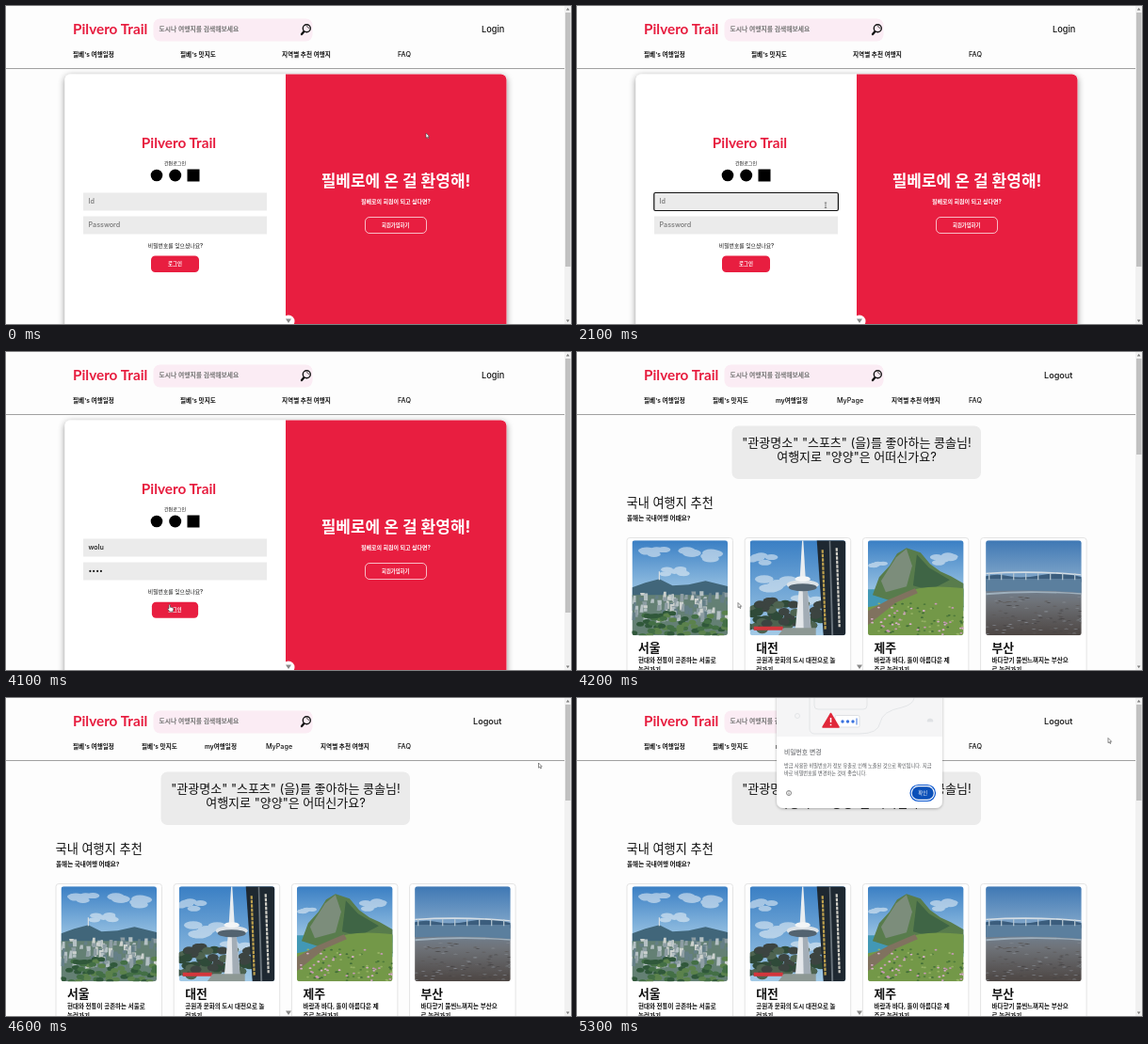
An HTML page that plays this animation: 600 px wide and 338 px high, repeating every 5.4 s.

```html
<!DOCTYPE html>
<html lang="ko">
<head>
<meta charset="utf-8">
<title>Travel login</title>
<style>
  html, body { margin: 0; width: 100%; height: 100%; overflow: hidden; background: #fdfdfd; }
  svg { display: block; }
  text { font-family: Inter, "Noto Sans CJK KR", "Noto Sans CJK", sans-serif; font-weight: 500; fill: #111; }
  .logo { font: 700 15.3px Lato, sans-serif; fill: #e71d3f; }
  .nav text { font-size: 6.6px; font-weight: 600; }
  .nav .en { font-size: 7.2px; font-weight: 500; }
  .b { font-weight: 700; }
  .s { font-weight: 600; }
  .r { font-weight: 400; }
  .m { text-anchor: middle; }
  .w { fill: #fff; }
  .hint { fill: #757575; }
  .soft { fill: #505357; }
  .field { fill: #ebebeb; }
  .red { fill: #e81e40; }
</style>
</head>
<body>
<svg width="600" height="338" viewBox="0 0 600 338">
  <defs>
    <filter id="shadow" x="-10%" y="-10%" width="120%" height="120%">
      <feDropShadow dx="0" dy="2" stdDeviation="3.5" flood-opacity=".45"/>
    </filter>
    <filter id="faint" x="-10%" y="-10%" width="120%" height="120%">
      <feDropShadow dx="0" dy="1" stdDeviation="1.5" flood-opacity=".28"/>
    </filter>
    <linearGradient id="sky" x2="0" y2="1">
      <stop stop-color="#3a7fc4"/><stop offset="1" stop-color="#a3cae6"/>
    </linearGradient>
    <linearGradient id="dusk" x2="0" y2="1">
      <stop stop-color="#3f78b4"/><stop offset="1" stop-color="#86aacb"/>
    </linearGradient>
    <linearGradient id="sand" x2="0" y2="1">
      <stop stop-color="#7188a0"/><stop offset=".4" stop-color="#6f7379"/><stop offset="1" stop-color="#4c4542"/>
    </linearGradient>
    <clipPath id="round"><rect width="101.5" height="101" rx="3"/></clipPath>
  </defs>
  <rect width="600" height="338" fill="#fdfdfd"/>

  <!-- header -->
  <text class="logo" x="71" y="30">Pilvero Trail</text>
  <rect x="156.5" y="13.5" width="169" height="24" rx="7" fill="#fbecf4"/>
  <text class="s hint" x="162.5" y="27.2" font-size="6.8">도시나 여행지를 검색해보세요</text>
  <g fill="none" stroke="#111" stroke-linecap="round">
    <circle cx="319.3" cy="23.8" r="4" stroke-width="1.4"/>
    <path d="M316.3 27.2l-2.3 2.8" stroke-width="2.3"/>
    <path d="M319.3 21.6a2.3 2.3 0 0 1 2.2 2" stroke-width=".7"/>
  </g>
  <path d="M0 66.5H593" stroke="#a0a0a0"/>

  <g id="loginPage">
    <text x="505" y="27.8" font-size="9.2">Login</text>
    <g class="nav">
      <text x="71" y="53.8">필베's 여행일정</text>
      <text x="185" y="53.8">필베's 맛지도</text>
      <text x="293" y="53.8">지역별 추천 여행지</text>
      <text class="en" x="416" y="54">FAQ</text>
    </g>
    <rect x="62.5" y="72.5" width="469" height="290" rx="6" fill="#fff" filter="url(#shadow)"/>
    <path class="red" d="M297 72.5H525.5a6 6 0 0 1 6 6V338H297z"/>

    <text class="logo m" x="183.5" y="151">Pilvero Trail</text>
    <text class="m" x="179.5" y="169" font-size="5">간편로그인</text>
    <circle cx="160" cy="180" r="6.3"/>
    <circle cx="179.7" cy="180" r="6.5"/>
    <rect x="192.5" y="173.5" width="13" height="13"/>

    <rect class="field" x="82" y="198.5" width="195" height="19"/>
    <rect class="field" x="82" y="223.5" width="195" height="19"/>
    <rect id="focus" x="81.8" width="195.6" height="19" rx="1.5" fill="none" stroke="#111" stroke-width="1.2"/>
    <text id="user" x="87.5" y="210" font-size="7.2"></text>
    <text id="pass" x="87.5" y="235.3" font-size="7.2"></text>
    <path id="caret" stroke="#111" stroke-width=".8"/>
    <text class="m" x="180" y="257" font-size="5.85">비밀번호를 잊으셨나요?</text>
    <g id="button">
      <rect class="red" x="154" y="265.5" width="51" height="17.5" rx="4.5"/>
      <text class="b m w" x="179.5" y="276" font-size="5.4">로그인</text>
    </g>

    <text class="b m w" x="414" y="192.2" font-size="17">필베로에 온 걸 환영해!</text>
    <text class="b m w" x="414" y="210.2" font-size="6">필베로의 회원이 되고 싶다면?</text>
    <rect x="381.5" y="224.5" width="65" height="17" rx="4.5" fill="none" stroke="#fff" stroke-width=".7"/>
    <text class="b m w" x="413.7" y="234.7" font-size="5.3">회원가입하기</text>
    <circle cx="300" cy="335" r="6.5" fill="#fff"/>
  </g>

  <g id="homePage">
    <text x="496" y="27.8" font-size="9.1">Logout</text>
    <g class="nav">
      <text x="71" y="53.8">필베's 여행일정</text>
      <text x="144" y="53.8">필베's 맛지도</text>
      <text x="211" y="53.8">my여행일정</text>
      <text class="en" x="276" y="54">MyPage</text>
      <text x="334" y="53.8">지역별 추천 여행지</text>
      <text class="en" x="416" y="54">FAQ</text>
    </g>
    <rect x="164.5" y="78.5" width="264.5" height="56.5" rx="7" fill="#ebebeb"/>
    <text class="r m" x="297" y="100.8" font-size="13">"관광명소" "스포츠" (을)를 좋아하는 콩솔님!</text>
    <text class="r m" x="297" y="116" font-size="13">여행지로 "양양"은 어떠신가요?</text>
    <text class="r" x="52.5" y="165.3" font-size="13.2">국내 여행지 추천</text>
    <text class="b" x="53" y="178.8" font-size="6.6">올해는 국내여행 어때요?</text>
    <g id="cards"></g>
  </g>
  <path d="M297 332.5h6l-3 4.5z" fill="#888"/>

  <g id="popup">
    <path d="M212 -9H388V110a7 7 0 0 1 -7 7H219a7 7 0 0 1 -7 -7z" fill="#fff" filter="url(#faint)"/>
    <path d="M212 0H388V41H212z" fill="#f5f5f6"/>
    <g fill="none" stroke="#dfe1e4" stroke-width=".8">
      <path d="M247 0V33a5 5 0 0 0 5 5H300Q320 38 322 26T345 10Q357 7 358 0M252 0V8a4 4 0 0 0 4 4H304a4 4 0 0 0 4 -4V0"/>
      <circle cx="234" cy="19" r="2.5"/>
      <path d="M372 25a3 3 0 0 1 6 0z" fill="#dfe1e4"/>
    </g>
    <rect x="274" y="18.5" width="26" height="12.5" rx="1.5" fill="#fff" stroke="#dfe1e4"/>
    <g fill="#3b73e0">
      <circle cx="282" cy="25" r="1.7"/><circle cx="287.5" cy="25" r="1.7"/><circle cx="293" cy="25" r="1.7"/>
      <path d="M296.5 21.5h1v7h-1z"/>
    </g>
    <path d="M269.5 16.5l8.5 14.5h-17z" fill="#e0283a" stroke="#e0283a" stroke-width="1.5" stroke-linejoin="round"/>
    <path d="M269.5 21v5M269.5 27.7v1.5" stroke="#fff" stroke-width="1.5"/>
    <text class="r soft" x="220" y="60" font-size="6.8">비밀번호 변경</text>
    <text class="r soft" x="220" y="74" font-size="5.15">방금 사용한 비밀번호가 정보 유출로 인해 노출된 것으로 확인됩니다. 지금</text>
    <text class="r soft" x="220" y="82.3" font-size="5.15">바로 비밀번호를 변경하는 것이 좋습니다.</text>
    <circle cx="225" cy="101" r="2.5" fill="none" stroke="#555" stroke-width=".7"/>
    <path d="M225 100.5v2M225 99.2v.6" stroke="#555" stroke-width=".7"/>
    <rect x="354" y="92.5" width="26.5" height="17" rx="8.5" fill="#fff" stroke="#0b57d0" stroke-width="1.2"/>
    <rect x="355.7" y="94.2" width="23" height="13.6" rx="6.8" fill="#0b50b8"/>
    <text class="m w" x="367.2" y="103" font-size="5.3">확인</text>
  </g>

  <!-- scrollbar -->
  <path d="M593 0h7v338h-7z" fill="#f1f1f1"/>
  <rect id="thumb" x="594" y="7" width="5.5" fill="#c1c1c1"/>
  <path d="M594.8 4.5h3.6l-1.8 -2.5zM594.8 333.5h3.6l-1.8 2.5z" fill="#777"/>

  <path id="cursor" stroke-width=".6" stroke-linejoin="round"/>
</svg>
<script>
const $ = id => document.getElementById(id);
const LOOP = 5400, STEP = 100;

// ---- cards with simplified photos ----
const repeat = (n, draw) => Array.from({ length: n }, (_, i) => draw(i)).join('');
const rand = i => { const s = Math.sin(i * 12.9898 + 4.1) * 43758.5453; return s - Math.floor(s); };
const shape = (d, fill) => `<path d="${d}" fill="${fill}"/>`;
const dot = (x, y, rx, ry, fill) => `<ellipse cx="${x}" cy="${y}" rx="${rx}" ry="${ry}" fill="${fill}"/>`;
const sky = (h, fill = 'sky') => `<rect width="102" height="${h}" fill="url(#${fill})"/>`;
const cloud = (x, y, s) => '<g opacity=".55">' + repeat(7, i =>
  dot(x + (rand(x + i) - .5) * 26 * s, y + (rand(y + i) - .5) * 8 * s, 7 * s, 3 * s, '#eef4f8')) + '</g>';
// Small random blobs inside a box.
const scatter = (n, x, y, w, h, rx, ry, colors) => repeat(n, i =>
  dot(x + rand(i + x) * w, y + rand(i + 300) * h, rx, ry, colors[i % colors.length]));

const city = sky(60) + cloud(22, 12, 1) + cloud(72, 16, 1.3) + cloud(45, 33, .9)
  + shape('M0 50L14 45 29 41 43 48 60 47 78 43 102 49V75H0z', '#41667a')
  + shape('M28.3 42V33h1.2v9z', '#d5dde2')
  + shape('M0 58H102V101H0z', '#648074')
  + repeat(90, i => {
      const y = 54 + i * .3, h = 2 + rand(i) * 8;
      return shape(`M${rand(i + 90) * 100} ${y}h${2 + rand(i + 40) * 3}v${h}h-4z`, ['#b4c0c3', '#8d9da3', '#ccd1ce', '#657f87'][i % 4]);
    })
  + scatter(70, 0, 77, 102, 25, 4, 2.5, ['#436f45', '#5b824c', '#30583a']);

const tower = sky(101) + cloud(14, 20, 1) + cloud(24, 46, 1.4) + cloud(58, 62, 1)
  + scatter(60, -4, 64, 80, 32, 6, 4, ['#2f4a39', '#4e6350', '#3c4441'])
  + shape('M55.4 0h1.2L59 40h-6z', '#e9edf0')
  + shape('M52 52h9l4 44H48z', '#e4e7ea') + shape('M56 52h5l4 44h-8z', '#a3adb6')
  + dot(56, 47, 17, 5, '#dce2e7') + dot(56, 50, 15, 4, '#536370') + dot(56, 41, 8, 3, '#f3f5f6')
  + shape('M71 0H102V101H78z', '#1e2831') + shape('M84 0h1.5l3 101h-2z', '#69737b')
  + '<g stroke-width="2.2" stroke-dasharray="3.5 1"><path d="M77 10L80 95" stroke="#bda04d"/><path d="M92 8L95 92" stroke="#d1cfc7"/></g>'
  + shape('M4 91.5H35V95.5H4z', '#d3363c') + shape('M36 93H70V101H30z', '#8d9894');

const peak = sky(60) + cloud(83, 20, 1) + cloud(10, 26, .7)
  + shape('M0 52H102V75H0z', '#4298b5')
  + shape('M5 58L12 39 23 27 31 14 41 8 56 13 66 25 77 33 88 38 102 46V70L30 66z', '#587c4c')
  + shape('M14 43L30 18 41 9 47 27 41 49 19 55z', '#7c8d7b') + shape('M52 15L65 29 87 42 66 53 48 48z', '#3f6545')
  + shape('M0 71Q28 66 42 56T102 51V101H0z', '#739848')
  + shape('M0 75L22 63 50 51 53 56 30 66 0 90z', '#80725f')
  + scatter(100, 3, 67, 100, 34, 1.4, .9, ['#c798b5', '#4f7b3b', '#d9afca', '#95b264', '#426d38']);

const beach = sky(45, 'dusk') + shape('M0 38Q12 35 25 38T58 37 102 39V44H0z', '#3b5d7d')
  + shape('M0 41H102V101H0z', 'url(#sand)')
  + shape('M0 41H102V56Q65 52 0 54z', '#5b7f9e')
  + shape('M0 34.5Q50 31 102 36V37.3Q50 33 0 36z', '#d4dde4')
  + repeat(8, i => shape(`M${i * 13 + 3} 35h1.2v7h-1.2z`, '#b9c8d3'))
  + shape('M0 56Q45 52 102 56V57.5Q50 54 0 58z', '#9fb0bd')
  + scatter(110, 0, 60, 102, 40, 2.5, .4, ['#454344', '#858a91', '#5a5655']);

const cards = [
  [city, '서울', '현대와 전통이 공존하는 서울로', '놀러가기'],
  [tower, '대전', '공원과 문화의 도시 대전으로 놀', '러가기'],
  [peak, '제주', '바람과 바다, 돌이 아름다운 제', '주로 놀러가기'],
  [beach, '부산', '바다향기 물씬느껴지는 부산으', '로 놀러가기']
];
$('cards').innerHTML = cards.map(([photo, name, line1, line2], i) => `
  <g transform="translate(${53 + i * 125.2} 197.5)">
    <rect width="112.5" height="160" rx="3" fill="#fff" stroke="#e4e4e4"/>
    <g transform="translate(5.5 2.7)" clip-path="url(#round)">${photo}</g>
    <text class="s" x="12" y="121.2" font-size="12.8">${name}</text>
    <text class="s" x="12" y="132.5" font-size="6.5">${line1}</text>
    <text class="s" x="12" y="142" font-size="6.5">${line2}</text>
  </g>`).join('');

// ---- motion ----
const PATH = [ // time, x, y of the pointer tip
  [0, 446, 135], [400, 446, 135], [1300, 264, 209], [2500, 264, 209], [3000, 171, 257],
  [3300, 171, 257], [3700, 173, 268], [4100, 173, 268], [4200, 171, 266.5],
  [4600, 565.5, 69], [4800, 565.5, 69], [5200, 564, 42.5], [LOOP, 564, 42.5]
];
const CURSORS = {
  arrow: ['M0 0V5.2L1.2 4.2 2.1 6 3 5.6 2.1 3.8H3.7z', '#fff', '#444'],
  beam: ['M-1.2 0H1.2M0 0V5.5M-1.2 5.5H1.2', 'none', '#444'],
  hand: ['M0 1Q.8 -.3 1.5 1V3.3L4.5 4Q5 4.3 4.9 5.5L4.2 8H.8L-1.5 5Q-1.3 4 0 4.8z', '#fff', '#333']
};
const USER = 'wolu';
const typed = (t, start) => Math.max(0, Math.min(4, Math.floor((t - start) / STEP) + 1));
const show = (id, on) => $(id).setAttribute('display', on ? 'inline' : 'none');

function pointer(t) {
  const i = PATH.findIndex(p => p[0] > t);
  const [t0, x0, y0] = PATH[i - 1], [t1, x1, y1] = PATH[i];
  const u = (t - t0) / (t1 - t0), e = u * u * (3 - 2 * u);
  return [x0 + (x1 - x0) * e, y0 + (y1 - y0) * e];
}

function fill(id, value, hint) {
  $(id).textContent = value || hint;
  $(id).setAttribute('class', value ? '' : 'hint');
}

function render(t) {
  const home = t >= 4200;
  show('loginPage', !home);
  show('homePage', home);
  show('popup', t >= 4700);
  $('thumb').setAttribute('height', home ? 102 : 270);

  const user = USER.slice(0, typed(t, 2200)), pass = '•'.repeat(typed(t, 3200));
  fill('user', user, 'Id');
  fill('pass', pass, 'Password');
  const onPass = t >= 2700, focused = t >= 1500 && t < 4000;
  show('focus', focused);
  $('focus').setAttribute('y', onPass ? 223.5 : 198.5);
  show('caret', focused && (onPass ? pass : user));
  const end = 88 + $(onPass ? 'pass' : 'user').getComputedTextLength();
  $('caret').setAttribute('d', `M${end} ${onPass ? 229 : 204}v8`);
  const scale = t >= 4000 ? .965 : 1;
  $('button').setAttribute('transform', `translate(179.5 274.3) scale(${scale}) translate(-179.5 -274.3)`);

  const [x, y] = pointer(t);
  const overField = x > 82 && x < 277 && y > 198 && y < 242;
  const [d, inside, line] = CURSORS[home ? 'arrow' : overField ? 'beam' : x < 277 && y > 249 ? 'hand' : 'arrow'];
  const cursor = $('cursor');
  cursor.setAttribute('d', d);
  cursor.setAttribute('fill', inside);
  cursor.setAttribute('stroke', line);
  cursor.setAttribute('transform', `translate(${x} ${y})`);
}

// The screen refreshes ten times a second.
function tick() {
  render(Math.floor(performance.now() % LOOP / STEP) * STEP);
  requestAnimationFrame(tick);
}
tick();
</script>
</body>
</html>
```
